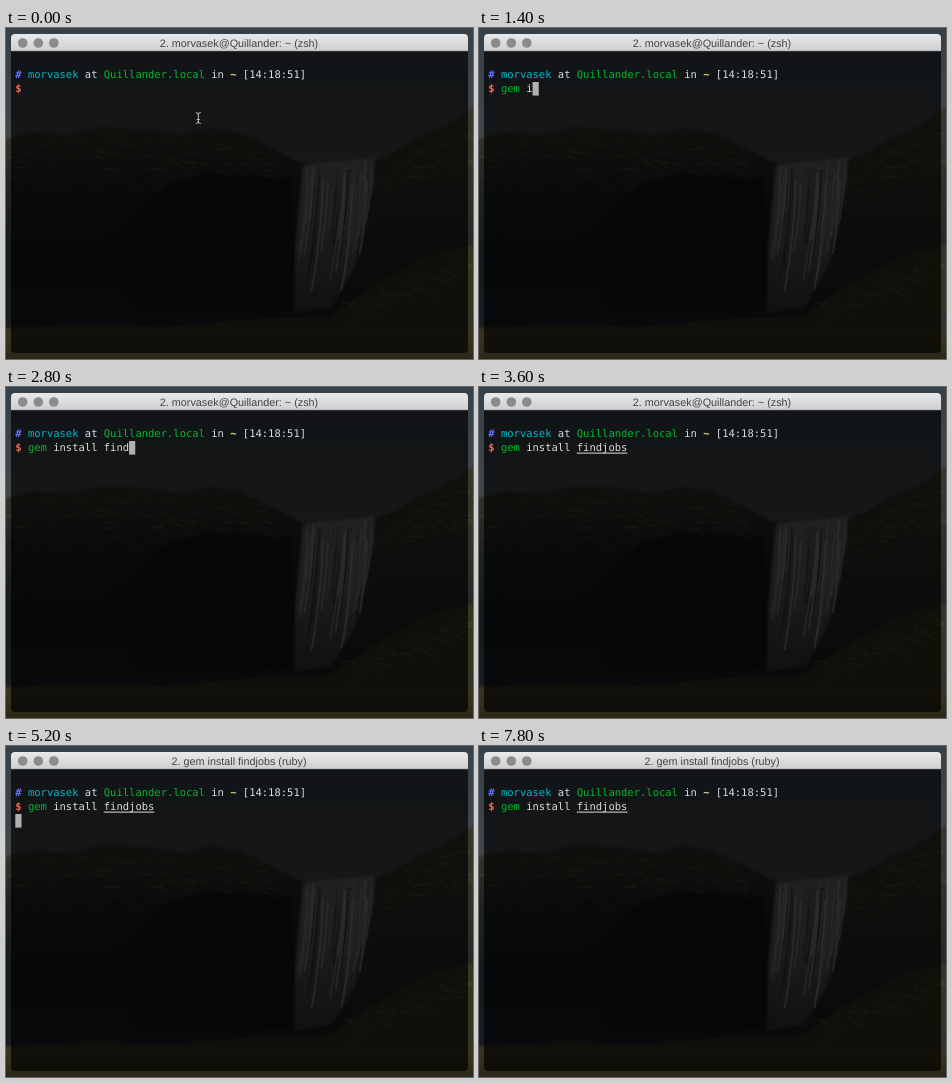
An HTML page with a canvas for the animation above (8000 ms loop, 467 by 331 pixels).

```html
<!DOCTYPE html>
<html lang="en">
<head>
<meta charset="utf-8">
<title>Terminal</title>
<style>
html, body { margin: 0; width: 100%; height: 100%; overflow: hidden; background: #111; }
canvas { display: block; }
</style>
</head>
<body>
<canvas id="stage" width="467" height="331"></canvas>
<script>
const W = 467, H = 331, LOOP = 8000, STEP = 200;
const ENTER = 4000, RUBY = 4800;
const USER = 'morvasek', HOST = 'Quillander', COMMAND = 'gem install findjobs';
const MONO = '10.5px "DejaVu Sans Mono", monospace';
const LEFT = 9.3, PITCH = 6.32, ROWS = [49.7, 63.7, 77.7];
const WHITE = '#dcdcdc', GREEN = '#00b92b', RED = '#f16b55';

const stage = document.getElementById('stage').getContext('2d');

function seeded(seed) {
  return () => (seed = (seed * 16807) % 2147483647) / 2147483647;
}

function shape(c, color, points) {
  c.fillStyle = color;
  c.beginPath();
  for (const [x, y] of points) c.lineTo(x, y);
  c.fill();
}

function gradient(c, y0, y1, ...colors) {
  const g = c.createLinearGradient(0, y0, 0, y1);
  colors.forEach((color, i) => g.addColorStop(i / (colors.length - 1), color));
  return g;
}

// Short slanted strokes that suggest grass and rock inside a band.
function texture(c, random, count, x, y, w, h, slope, color) {
  c.strokeStyle = color;
  for (let i = 0; i < count; i++) {
    const px = x + random() * w, length = 4 + random() * 12;
    const py = y + random() * h + (px - x) * slope;
    c.globalAlpha = 0.1 + random() * 0.3;
    c.lineWidth = 0.6 + random() * 2;
    c.beginPath();
    c.moveTo(px, py);
    c.lineTo(px + length, py + length * (random() - 0.35));
    c.stroke();
  }
  c.globalAlpha = 1;
}

function drawLandscape(c) {
  const random = seeded(71);
  c.fillStyle = gradient(c, 0, 150, '#485663', '#525b60', '#626463');
  c.fillRect(0, 0, W, H);
  c.filter = 'blur(1px)';
  shape(c, gradient(c, 98, 290, '#464a38', '#292f2d', '#1d2427', '#20272a'),
    [[-5, 112], [28, 104], [65, 107], [92, 99], [145, 101], [176, 107], [205, 99],
     [235, 105], [264, 119], [299, 137], [330, 320], [-5, 320]]);
  shape(c, gradient(c, 105, 300, '#464936', '#343b32', '#222a28'),
    [[362, 134], [385, 126], [410, 111], [438, 99], [472, 76], [472, 320], [280, 320], [340, 235]]);
  shape(c, '#1a2021', [[160, 157], [200, 145], [285, 150], [292, 280], [135, 285], [92, 220]]);
  shape(c, '#474630', [[472, 215], [420, 230], [365, 260], [320, 292], [472, 294]]);
  shape(c, gradient(c, 288, 331, '#434333', '#4b452b', '#39351f'),
    [[-5, 300], [90, 296], [160, 299], [260, 290], [472, 287], [472, 335], [-5, 335]]);
  c.filter = 'none';

  texture(c, random, 140, 0, 106, 260, 35, 0.03, '#77764d');
  texture(c, random, 100, 370, 132, 100, 38, -0.35, '#777449');
  texture(c, random, 80, 0, 150, 280, 130, 0, '#080e12');
  texture(c, random, 70, 335, 275, 130, 22, -0.42, '#77704b');

  // Waterfall and its mist
  c.filter = 'blur(1px)';
  shape(c, gradient(c, 130, 285, '#858d90', '#6e777a', '#41494b'),
    [[297, 138], [318, 134], [344, 132], [369, 129], [368, 155], [358, 205],
     [350, 238], [326, 279], [288, 285], [289, 220]]);
  c.filter = 'none';
  for (let i = 0; i < 42; i++) {
    const k = random(), x = 297 + k * 70, top = 138 - k * 8 + random() * 28;
    const end = top + 40 + random() * 75;
    c.strokeStyle = i % 3 ? '#d9dee0' : '#222b2e';
    c.globalAlpha = 0.25 + random() * 0.4;
    c.lineWidth = 0.7 + random() * 1.5;
    c.beginPath();
    c.moveTo(x, top);
    c.quadraticCurveTo(x - 1, (top + end) / 2, x - (end - top) * 0.1, end);
    c.stroke();
  }
  c.globalAlpha = 1;
}

function dot(c, x, y, r, color) {
  c.fillStyle = color;
  c.beginPath();
  c.arc(x, y, r, 0, Math.PI * 2);
  c.fill();
}

function drawWindow(c) {
  c.save();
  c.fillStyle = 'rgba(0,0,0,.25)';
  c.fillRect(0, 0, W, H);
  c.beginPath();
  c.roundRect(5, 6, 457, 319, 4);
  c.clip();
  c.fillStyle = 'rgba(0,0,0,.69)';
  c.fillRect(5, 23, 457, 302);
  c.fillStyle = gradient(c, 6, 23, '#e9e9e9', '#cfcfcf');
  c.fillRect(5, 6, 457, 17);
  c.fillStyle = '#aaa';
  c.fillRect(5, 22.5, 457, 0.7);
  for (const x of [16.7, 32.3, 47.8]) dot(c, x, 15, 4.8, '#8b8b8b');
  c.restore();
}

function write(text, column, row, color, bold) {
  stage.font = (bold ? 'bold ' : '') + MONO;
  stage.fillStyle = color;
  stage.fillText(text, LEFT + column * PITCH, ROWS[row]);
}

function drawPrompt() {
  write('#', 0, 0, '#6871ff', true);
  write(USER, 2, 0, '#00b9cb');
  write('at', 11, 0, WHITE);
  write(HOST + '.local', 14, 0, GREEN);
  write('in', 31, 0, WHITE);
  write('~', 34, 0, '#e5d77d', true);
  write('[14:18:51]', 36, 0, WHITE);
  write('$', 0, 1, RED, true);
}

function drawTitle(time) {
  const shell = time < RUBY ? 'zsh' : 'ruby';
  const task = time < ENTER ? `${USER}@${HOST}: ~` : COMMAND;
  stage.font = '10.8px "Liberation Sans", Arial, sans-serif';
  stage.fillStyle = '#444';
  stage.textAlign = 'center';
  stage.fillText(`2. ${task} (${shell})`, 233, 19);
  stage.textAlign = 'left';
}

function typedCount(time) {
  const count = time < 2000 ? (time - 800) / 120 : 10 + (time - 2000) * 6 / 800;
  return Math.max(0, Math.min(COMMAND.length, Math.floor(count)));
}

function drawCommand(count) {
  const known = count >= 3;
  write(COMMAND.slice(0, Math.min(count, 3)), 2, 1, known ? GREEN : RED, !known);
  write(COMMAND.slice(4, Math.max(4, count)), 6, 1, WHITE);
  if (count === COMMAND.length) {
    stage.fillStyle = WHITE;
    stage.fillRect(LEFT + 14 * PITCH, 65.6, 8 * PITCH, 1);
  }
}

function drawCursor(time, count) {
  const typing = count > 0 && time < 3600;
  const phase = time % 1000;
  const visible = typing || (time < 1000 ? phase >= 500 : phase < 500);
  if (!visible) return;
  const entered = time >= ENTER;
  stage.fillStyle = '#b0b0b0';
  stage.fillRect(LEFT + (entered ? 0 : 2 + count) * PITCH, entered ? 68 : 54, 6.2, 13.6);
}

function drawPointer() {
  const beam = new Path2D('M189.8 84.5Q192.3 84.5 192.3 86.5Q192.3 84.5 194.8 84.5' +
    'M192.3 86V94M189.8 95.5Q192.3 95.5 192.3 93.5Q192.3 95.5 194.8 95.5M190.8 91.5H193.8');
  stage.strokeStyle = '#111';
  stage.lineWidth = 2.2;
  stage.stroke(beam);
  stage.strokeStyle = '#d5d5d5';
  stage.lineWidth = 0.9;
  stage.stroke(beam);
}

const backdrop = document.createElement('canvas');
backdrop.width = W;
backdrop.height = H;
const back = backdrop.getContext('2d');
drawLandscape(back);
drawWindow(back);
stage.textRendering = 'geometricPrecision';

function render(now) {
  const time = Math.floor((now % LOOP) / STEP) * STEP;
  const count = typedCount(time);
  stage.drawImage(backdrop, 0, 0);
  drawTitle(time);
  drawPrompt();
  drawCommand(count);
  drawCursor(time, count);
  if (count === 0) drawPointer();
}

const start = performance.now();
function tick() {
  render(performance.now() - start);
  requestAnimationFrame(tick);
}
tick();
</script>
</body>
</html>
```
